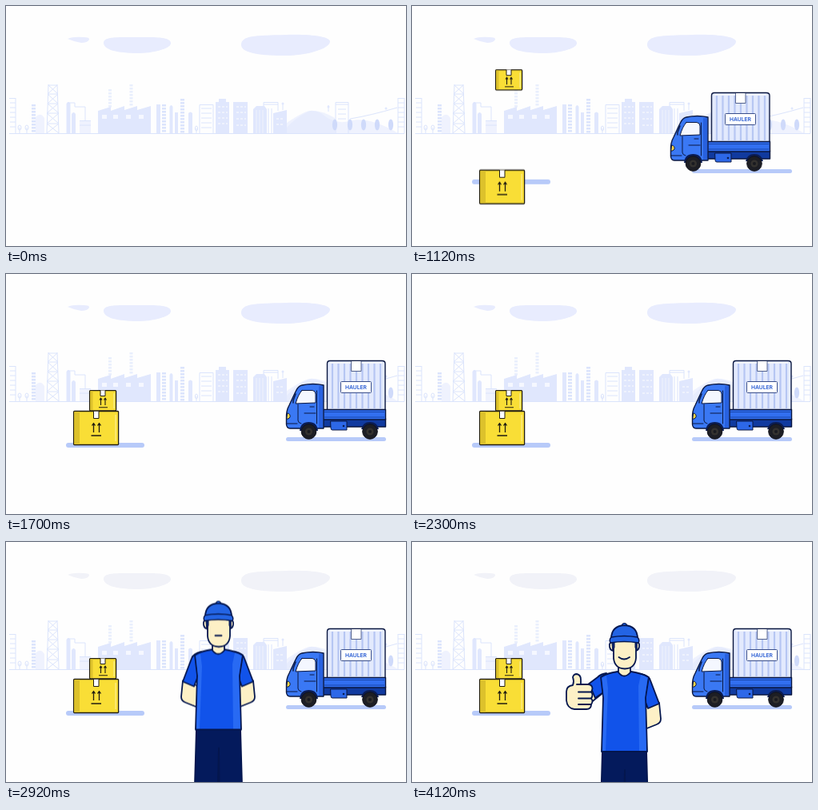
Recreate the animation shown at these times as an HTML page. Size 500 px wide and 300 px high, loop 4140 ms.

```html
<!DOCTYPE html>
<html lang="en">
<head>
<meta charset="utf-8">
<title>Delivery scene</title>
<style>
  html, body { margin: 0; width: 100%; height: 100%; overflow: hidden; background: #fefefe; }
  svg { display: block; width: 100vw; height: 100vh; }

  .clouds, .fade, .rest, .cheer, .thumb { animation: 4140ms linear infinite both; }
  /* moves settle with an overshoot */
  .slab, .truck, .big, .small, .man {
    animation: 4140ms cubic-bezier(.33333, 1.8, .66667, 1) infinite both;
  }
  .clouds { animation-name: clouds; }
  .fade { animation-name: fade; }
  .slab { animation-name: slab; }
  .truck { animation-name: truck; }
  .big { animation-name: big; }
  .small { animation-name: small; }
  .man { animation-name: man; }
  .rest { animation-name: rest; }
  .cheer { animation-name: cheer; }
  .thumb { animation-name: thumb; transform-origin: 237px 174px; }

  @keyframes clouds {
    0%, 69.56% { fill: #e8ecfe; }
    69.57%, 100% { fill: #f1f2f8; }
  }
  @keyframes fade {
    0%, 21.256% { opacity: 0; }
    25.6%, 100% { opacity: 1; }
  }
  @keyframes slab {
    0%, 21.739% { transform: translateY(-37px); }
    33.816%, 100% { transform: none; }
  }
  @keyframes truck {
    0%, 21.739% { transform: translateX(173px); }
    33.816%, 100% { transform: none; }
  }
  @keyframes big {
    0%, 21.739% { transform: translateY(-215px); }
    33.816%, 100% { transform: none; }
  }
  @keyframes small {
    0%, 25.362% { transform: translateY(-173px); }
    37.44%, 100% { transform: none; }
  }
  @keyframes man {
    0%, 61.691% { transform: translateY(260px); }
    73.768%, 100% { transform: none; }
  }
  @keyframes rest {
    0%, 74.395% { opacity: 1; }
    74.396%, 100% { opacity: 0; }
  }
  @keyframes cheer {
    0%, 74.395% { opacity: 0; }
    74.396%, 100% { opacity: 1; }
  }
  @keyframes thumb {
    0%, 74.396% { transform: rotate(-65deg); animation-timing-function: ease-out; }
    78.26%, 100% { transform: none; }
  }

  .city { fill: #e0e7fd; stroke: #dbe4fc; stroke-width: 0; }
  .city .line { fill: none; stroke-width: 1; }
  .city .pale { fill: #eff2fe; }
  .city .gap { fill: none; stroke: #fefefe; stroke-width: 1.2; }
  .city .band { fill: none; stroke-width: 5; stroke-dasharray: 2.6 1.4; }
  .ink { stroke: #04164e; stroke-width: 1.8; stroke-linejoin: round; stroke-linecap: round; }
  .truck .ink { stroke: #0a1740; stroke-width: 1.4; }
  .truck .thin { stroke-width: 1; }
  .box { stroke: #211d12; stroke-width: 1.3; stroke-linejoin: round; }
  .none { fill: none; }
  .skin { fill: #fdf0c6; }
  .blue { fill: #1153ea; }
  .light { fill: #2f70f6; }
  .cap { fill: #2364e4; }
</style>
</head>
<body>
<svg viewBox="0 0 500 300" preserveAspectRatio="none">
  <defs>
    <g id="tree">
      <ellipse cy="148.5" rx="3.1" ry="7" fill="#cfdafa"/>
      <path class="line" d="M0 149V159"/>
    </g>
    <g id="wheel">
      <circle r="9.3" fill="#1d1e24" stroke="#11131c"/>
      <circle r="4.6" fill="#34322f"/>
      <circle r="2" fill="#191a20"/>
    </g>
    <g id="arm">
      <path class="skin ink" d="M309 201L311 221Q311 226 306 228L291 234V207Z"/>
      <path class="blue ink" d="M286 165Q296 167 298 173L309 202L295 208L288 190Z"/>
    </g>
  </defs>

  <g class="clouds">
    <path d="M77 41Q84 38 97 39Q105 39 104 42Q102 46 94 46Q86 45 77 41Z"/>
    <path d="M122 46C122 38 140 39 165 39C185 39 207 38 206 47C205 54 180 60 160 59C135 58 122 54 122 46Z"/>
    <path d="M294 48C295 37 310 37 350 36C380 35 406 38 405 45C403 55 370 63 345 62C315 62 293 58 294 48Z"/>
  </g>

  <g class="city">
    <path class="pale" d="M334 159Q356 141 373 133Q383 128 394 134Q412 150 432 143Q456 139 490 159Z"/>
    <path d="M345 159Q360 139 380 131Q395 130 411 140V159Z" opacity=".5"/>
    <path class="line" d="M4 159.5H498M12 115V159M498 115V159M490 115V159M4 115.5H12M5 121H12M5 127H12M5 133H12M5 139H12M5 145H12M5 151H12M490 115.5H498M490 121H498M490 127H498M490 133H498M490 139H498M490 145H498M490 151H498"/>
    <path class="line" d="M17 152V159M26 152V159M238 153V159"/>
    <g class="line">
      <ellipse cx="17" cy="152" rx="2" ry="3"/>
      <ellipse cx="26" cy="152" rx="2" ry="3"/>
      <ellipse cx="238" cy="153" rx="1.6" ry="3"/>
    </g>
    <path class="band" d="M34.5 123V159M197.5 123V159M220.5 116V159"/>
    <path class="band" d="M130 104V128M156.500 98V126" style="stroke-width:4" opacity=".6"/>
    <path class="pale" d="M37 159V139Q43 132 48 140V159Z"/>
    <path class="line" d="M53 98L51 159M64 98L66 159M53 99H64M52 110H65M52 122H65M51 134H66M51 147H66M53 99L65 110M64 99L52 110L65 122M65 110L52 122L66 134M65 122L51 134L66 147M66 134L51 147L66 159M66 147L51 159"/>
    <path d="M75.500 122q2.500-4 5 0V159h-5zM82 135q2.500-4 5 0V159h-5z"/>
    <path class="line" d="M77 121H86V126H99V143"/>
    <path class="pale" d="M92 143H106V159H92Z"/>
    <path class="line" d="M92 143.500H106M92 149H106"/>
    <path d="M115 159V131L131 126V131L148 125V130L164 125V130L181 125V159Z"/>
    <path fill="#f5f7ff" d="M120 136h6v5h-6zM134 136h6v5h-6zM150 136h6v5h-6zM166 136h6v5h-6z"/>
    <path d="M188 123h5v36h-5zM204.500 126q2-4 4 0V159h-4zM211 133h4v26h-4zM228 134q2.500-3 5 0V159h-5z"/>
    <path class="line" d="M242 159V123.500H259V159M244 128H257M244 134H257M244 140H257M244 146H257M244 152H257"/>
    <path d="M262 120H266V116H275V120H279V159H262ZM284 120H302V159H284ZM309 129L313 125H323L326 129V159H309ZM334 134L351 130V159H334Z"/>
    <path class="gap" stroke-dasharray="3 2" d="M265 126H277M265 133H277M265 140H277M265 147H277M288 126H300M288 133H300M288 141H300M288 149H300M338 141H348M338 148H348"/>
    <path class="gap" d="M313 130V159M317 130V159M321 130V159" opacity=".5"/>
    <path class="line" d="M322 125V120.500H340V131M322 123H340M328 128V159M332 128V159M412 159V120.500H428V159M412 123H428M415 129H425M415 135H425M415 141H425M346 121V130M403 124V132M430 141Q455 137 489 127"/>
    <circle cx="346" cy="122" r="1.500"/><circle cx="403" cy="126" r="1.500"/><circle cx="475" cy="128" r="1.500"/>
    <use href="#tree" x="411"/><use href="#tree" x="430"/><use href="#tree" x="447"/>
    <use href="#tree" x="464"/><use href="#tree" x="481"/>
  </g>

  <g class="fade" fill="#b7caf9">
    <rect class="slab" x="75" y="211" width="98" height="6" rx="3"/>
    <rect x="350" y="204" width="125" height="5" rx="2.500"/>
  </g>

  <g class="truck">
    <path class="ink" fill="#e3eafd" d="M401.500 170V112Q401.500 108.500 405 108.500H470Q474 108.500 474 112V170Z"/>
    <path fill="none" stroke="#b6c6f3" stroke-width="2.200" d="M408 112V168M415.500 112V168M423 112V168M430.500 112V168M445.500 112V168M453 112V168M460.500 112V168M468 112V168M438 122V168"/>
    <path fill="none" stroke="#fff" d="M405 111H470"/>
    <path fill="#fff" stroke="#53628e" d="M431.500 109V121.500H444V109"/>
    <rect x="418.500" y="134.500" width="38" height="14" rx="1" fill="#fff" stroke="#3a4f8c"/>
    <text x="437.500" y="143.800" text-anchor="middle" font-family="Inter, Roboto, sans-serif" font-weight="700" font-size="6.700" fill="#3767d6">HAULER</text>
    <path class="ink" fill="#103a9f" d="M395 181H474.500V191H395Z"/>
    <path class="ink" fill="#326ff0" d="M396 169.500H474.500V182H396Z"/>
    <path fill="none" stroke="#1746ae" d="M398 172.500H473M398 179H473"/>
    <path class="ink thin" fill="#2d68e8" d="M406 184H426V195H408Q406 195 406 193Z"/>
    <circle cx="422" cy="190" r="1.300" fill="#0b1c52"/>
    <path class="ink" fill="#3a78f4" d="M397 139Q384 136 370 139Q365 140 362 147L354 164Q350 171 350.500 181V188Q351 193 355 193H397Z"/>
    <path fill="#2861df" d="M391 140H396V192H391Z"/>
    <path class="ink thin" fill="#f4f7ff" d="M370 145.500H383Q387 146 387 150V161L362 162Q365 151 370 145.500Z"/>
    <path class="ink thin none" d="M365 163V183Q365 186 369 187M388.500 146V187M373 174H387M380 166H385M351 187H364"/>
    <path class="ink none" d="M362 150L359 158V161"/>
    <path class="ink thin" fill="#f7d64b" d="M352 174Q356 175 355 179L353 181H351Z"/>
    <path fill="#0b1c52" d="M367 196Q368 185 378.500 185Q389 185 390 196ZM444 194Q446 185 455 185Q464 185 466 194Z"/>
    <use href="#wheel" x="378.500" y="197"/><use href="#wheel" x="455" y="197"/>
  </g>

  <g class="big">
    <rect class="box" x="84.600" y="171.500" width="56" height="42" rx="1" fill="#f9de36"/>
    <path fill="#dcc12c" d="M85.300 172.200H92V212.800H85.300Z"/>
    <path fill="none" stroke="#fff0a0" d="M137 176V209"/>
    <path class="box" style="stroke-width:1" fill="#fff" d="M109.500 171.500V180.500H116V171.500"/>
    <path class="box none" d="M109.500 198V187M107.500 189.500L109.500 186.500L111.500 189.500M116.500 198V187M114.500 189.500L116.500 186.500L118.500 189.500M106.500 202H119"/>
  </g>
  <g class="small">
    <rect class="box" x="104.600" y="145.600" width="33" height="25.200" rx="1" fill="#f9de36"/>
    <path fill="#dcc12c" d="M105.300 146.300H108.500V170.100H105.300Z"/>
    <path fill="none" stroke="#fff0a0" d="M135 149V168"/>
    <path class="box" style="stroke-width:1" fill="#fff" d="M118 145.500V152.500H124V145.500"/>
    <path class="box none" style="stroke-width:1.100" d="M118.500 164V155.500M117 157.500L118.500 155L120 157.500M124 164V155.500M122.500 157.500L124 155L125.500 157.500M116 166.700H127"/>
  </g>

  <g class="man">
    <use href="#arm"/>
    <use class="rest" href="#arm" transform="matrix(-1 0 0 1 530 0)"/>
    <g class="cheer">
      <g class="thumb">
        <path class="skin ink" d="M218 181L229 174L237 190L222 202Z"/>
        <path class="blue ink" d="M243 164Q236 165 232 169L220 178Q226 186 229 195L242 186Z"/>
        <path class="skin ink" d="M201 179Q203 174 201 169Q202 165 206 165Q211 166 211 172V178H220Q225 178 225.500 183Q225 186 224 187.500Q227 191 224 195.500Q227 199 224 203Q224 209 218 209H203Q194 208 193 198V187Q193 180 201 179Z"/>
        <path class="ink none" d="M208 187.500H224M208 195.500H224M208 203H224M211 178H206"/>
      </g>
    </g>
    <path class="ink" fill="#041a5c" d="M238 260H293L296 365H267L266 285L264 365H235Z"/>
    <path class="blue ink" d="M257 162Q243 164 236 169L239 194L237 262H294L292 194L296 169Q287 164 274 162Z"/>
    <path class="light" d="M286 166Q291 167 294.500 170L291 195L293 261H284L283 180ZM237.500 170L243 167L245 183L242 261H238L240 195Z" opacity=".8"/>
    <path class="skin ink" d="M258 152V163Q265 172 273 163V152Z"/>
    <path class="skin ink" d="M251 125Q246 125 247 131Q248 136 252 136ZM280 125Q285 125 284 131Q283 136 279 136Z"/>
    <path class="skin ink" d="M252 122V145Q253 158 266 158.500Q279 158 280 145V122Z"/>
    <path class="ink" fill="#0b2770" d="M250 123H253V132L251 135ZM281 123H279V132L281 135Z" style="stroke-width:1"/>
    <path class="cap ink" d="M249 121Q249 105 265.500 104Q282 105 282 121Z"/>
    <path class="cap ink" style="stroke-width:1.200" d="M262.500 104Q263 101.500 265.500 101.500Q268 101.500 268.500 104Z"/>
    <path class="cap ink" style="stroke-width:1.400" d="M249 119Q265 116 282 119Q285 123 283 126Q265 123 248 126Q246 122 249 119Z"/>
    <path class="ink none rest" d="M261.500 144.500H269.500"/>
    <path class="ink none cheer" d="M258.500 144Q265 149 272 144"/>
  </g>
</svg>
</body>
</html>
```
